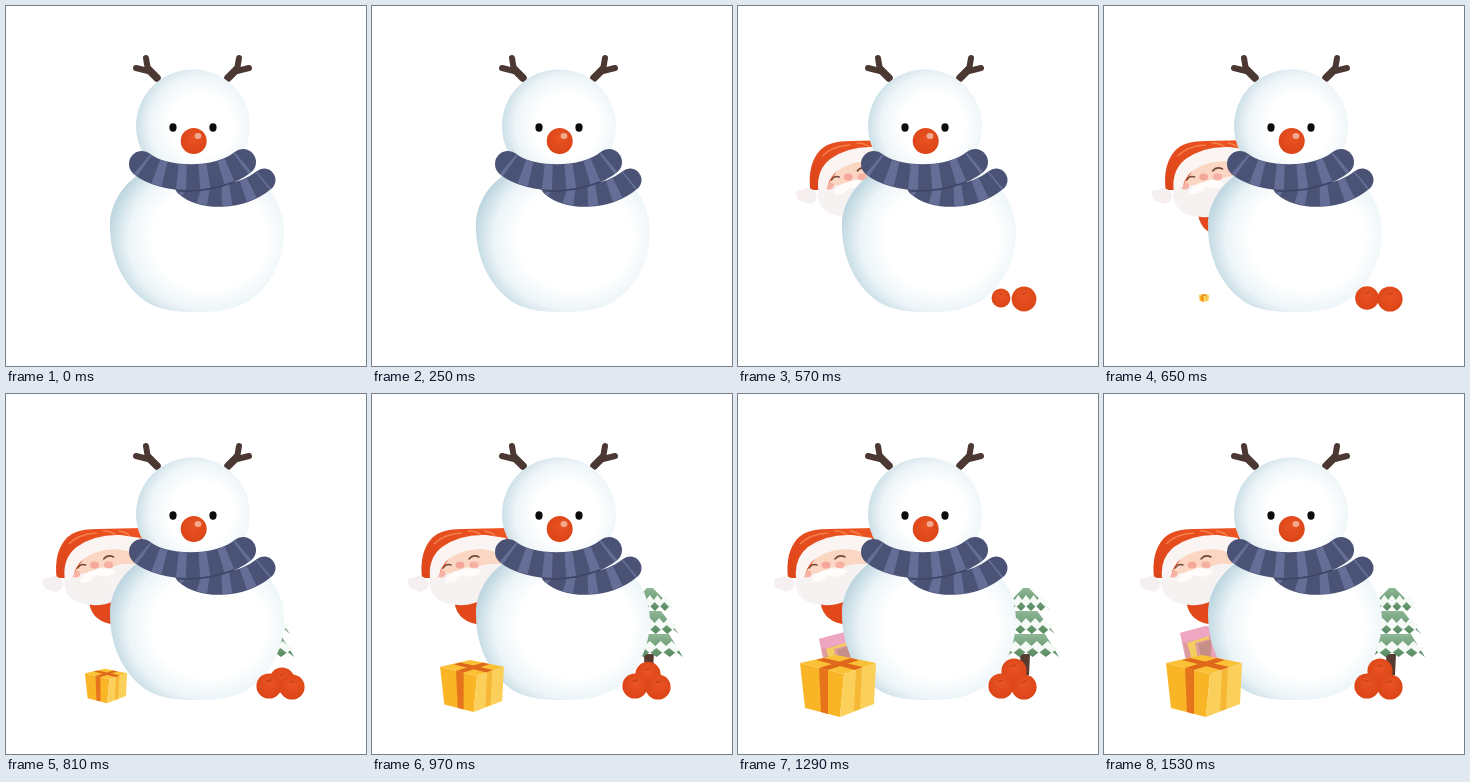
Write an HTML page that moves like this. It is 360 px wide and 360 px high and loops after 2.28 s.

```html
<!DOCTYPE html>
<html lang="en">
<head>
<meta charset="utf-8">
<title>Snowman and friends</title>
<style>
html, body { margin: 0; width: 100%; height: 100%; overflow: hidden; background: #fff; }
svg { display: block; width: 100vw; height: 100vh; }
</style>
</head>
<body>
<svg viewBox="0 0 360 360">
  <defs>
    <radialGradient id="headFill" cx=".57" cy=".5" r=".58">
      <stop offset=".48" stop-color="#fff"/>
      <stop offset=".78" stop-color="#eef5f8"/>
      <stop offset="1" stop-color="#c9dde6"/>
    </radialGradient>
    <radialGradient id="bodyFill" cx=".57" cy=".53" r=".58">
      <stop offset=".56" stop-color="#fff"/>
      <stop offset=".8" stop-color="#edf5f8"/>
      <stop offset="1" stop-color="#bfd7e1"/>
    </radialGradient>
    <radialGradient id="redFill" cx=".52" cy=".4" r=".62">
      <stop offset="0" stop-color="#ea5424"/>
      <stop offset="1" stop-color="#da4416"/>
    </radialGradient>
    <linearGradient id="hatFill" x1="0" y1="1" x2="1" y2="0">
      <stop offset="0" stop-color="#dd451a"/>
      <stop offset="1" stop-color="#ee5422"/>
    </linearGradient>
    <linearGradient id="pineFill" x1="0" y1="0" x2="0" y2="1">
      <stop offset="0" stop-color="#8fb796"/>
      <stop offset="1" stop-color="#568a60"/>
    </linearGradient>
    <g id="berry">
      <circle r="12.6" fill="url(#redFill)"/>
      <path d="M-2-5Q0-4 2-6" fill="none" stroke="#b53a18" stroke-linecap="round"/>
    </g>
    <g id="antler" fill="none" stroke="#4b3832" stroke-linecap="round" stroke-linejoin="round">
      <path d="M151 72L142 63" stroke-width="7.5"/>
      <path d="M142 64L140 52M142 65L130 62" stroke-width="6"/>
    </g>
  </defs>

  <g id="tree">
    <path d="M282 260H292L291 281H283Z" fill="#573a30"/>
    <g id="tiers"></g>
  </g>

  <g id="santa">
    <path d="M82 204Q83 226 104 230L124 230V196Z" fill="#e2481c"/>
    <path d="M58 182Q55 200 70 208Q90 215 108 207L130 190V160L90 162Z" fill="#f6f2f2"/>
    <path d="M66 176Q72 162 90 157Q114 152 128 160V170Q112 169 104 174Q92 171 84 179Q74 178 68 184Z" fill="#fbd6c2"/>
    <g fill="#f5a79a">
      <ellipse cx="69" cy="180" rx="4.6" ry="3.4" opacity=".8"/>
      <ellipse cx="102" cy="171" rx="4.6" ry="3.4" opacity=".8"/>
      <ellipse cx="88" cy="171" rx="4.4" ry="3.6"/>
    </g>
    <path d="M71 174Q74 169 79 171M97 165Q101 160 107 163" fill="none" stroke="#75493a" stroke-width="1.5" stroke-linecap="round"/>
    <path d="M88 176Q76 178 73 188Q83 190 90 181Q101 186 110 177Q100 172 88 176Z" fill="#fffcfb"/>
    <path d="M50 184Q47 158 60 144Q69 135 90 135L136 134V152L84 154L64 184Z" fill="url(#hatFill)"/>
    <path d="M62 150Q72 140 90 139M96 137Q106 137 110 142M112 137Q120 138 123 142" fill="none" stroke="#f57f48" stroke-width="1.4"/>
    <path d="M58 184Q56 164 70 153Q88 140 114 141L134 144V159Q108 151 88 159Q71 165 67 181Q63 188 58 184Z" fill="#faf5f3"/>
    <path d="M36 189Q35 183 42 184Q47 180 53 184Q59 190 55 195Q49 200 44 196Q37 196 36 189Z" fill="#f5f0ef"/>
  </g>

  <g id="pinkGift">
    <path d="M76 239L102 232L114 236V264L82 268Z" fill="#eba3ba"/>
    <path d="M79 248L106 242V263L83 268Z" fill="#dd9a9f"/>
    <path d="M76 239L102 232L106 242L80 249Z" fill="#eea6c2"/>
    <path d="M83 249L105 242V245L91 249L94 266H88Z" fill="#f4cd62"/>
    <path d="M94 250L107 246V263H97Z" fill="#c58f88"/>
  </g>

  <use href="#antler"/>
  <use href="#antler" transform="matrix(-1 0 0 1 373 0)"/>
  <path d="M191 150C230 150 278 178 278 225C278 252 267 276 248 291C232 304 212 306 191 306C168 306 148 304 133 290C114 273 104 248 104 220C104 180 145 150 191 150Z" fill="url(#bodyFill)"/>
  <ellipse cx="187" cy="120" rx="57" ry="56.5" fill="url(#headFill)"/>
  <g fill="#0d0b0b">
    <ellipse cx="167" cy="121.5" rx="3.6" ry="4.2"/>
    <ellipse cx="207" cy="121.5" rx="3.6" ry="4.2"/>
  </g>
  <circle cx="187.7" cy="135" r="13" fill="url(#redFill)"/>
  <ellipse cx="192" cy="130" rx="3.4" ry="3" fill="#f3a98e"/>
  <g id="scarf" fill="none"></g>

  <use id="berryTop" href="#berry"/>
  <use id="berryLeft" href="#berry"/>
  <use id="berryRight" href="#berry"/>

  <g id="gift" transform="translate(100 292)">
    <g transform="translate(-100 -292)">
      <path d="M62 269L106 280L102 323L67 314Z" fill="#f9b526"/>
      <path d="M106 280L138 269L136 310L102 323Z" fill="#fbd05a"/>
      <path d="M62 269L98 261L138 269L106 280Z" fill="#fac136"/>
      <path d="M81 274L90 276L90 320L83 318Z" fill="#e6741d"/>
      <path d="M118 276L124 274L122 315L116 317Z" fill="#f6b737"/>
      <path d="M81 274L113 264L121 266L90 276ZM117 276L78 266L86 264L125 273Z" fill="#e0681b"/>
    </g>
  </g>
</svg>
<script>
const LOOP = 2280, START = 250, STEP = 80, LAST = 17;
const $ = id => document.getElementById(id);

// Knitted band: round stroke with dashed stripes on the same curve.
const band = (d, width) => `
  <path d="${d}" stroke="#4a5275" stroke-width="${width}" stroke-linecap="round"/>
  <path d="${d}" stroke="#656e97" stroke-width="${width - 1}" stroke-dasharray="9 13" stroke-dashoffset="6"/>`;
$('scarf').innerHTML =
  band('M180 179C196 193 234 194 258 174', 23) +
  band('M136 158C156 175 212 177 237 156', 26) +
  '<path d="M174 185Q202 186 228 176" stroke="#3d4566" stroke-width="1.6"/>';

// Pine tier: green skirt with a zigzag band of snow.
function tier(i) {
  const x = 288, y = 194 + 23 * i, top = 3 + 8 * i, low = 25 + 4 * i;
  const zigzag = (base, half, shift) => Array.from({ length: 11 }, (_, k) =>
    `${x - half + half * k / 5} ${base + ((k + shift) % 2 ? -3 : 2)}`);
  const skirt = [`${x - top} ${y}`, `${x + top} ${y}`, ...zigzag(y + 21, low, 0).reverse()];
  const snow = [...zigzag(y + 10, low - 6, 0), ...zigzag(y + 17, low - 1, 1).reverse()];
  return `<polygon points="${skirt}" fill="url(#pineFill)"/><polygon points="${snow}" fill="#f6faf7"/>`;
}
$('tiers').innerHTML = [2, 1, 0].map(tier).join('');

// Every part eases out to its place (x, y), by a slide (dx, dy) or by growing.
const parts = [
  { id: 'santa', start: 0, steps: 8.6, dx: 127 },
  { id: 'berryRight', start: 1.5, steps: 4, x: 286, y: 293, grow: true },
  { id: 'berryLeft', start: 3, steps: 4, x: 263, y: 292, grow: true },
  { id: 'tree', start: 5, steps: 7.5, dx: -91 },
  { id: 'gift', start: 5.5, steps: 7.5, x: 100, y: 292, grow: true },
  { id: 'berryTop', start: 6, steps: 7, x: 276, y: 277, dy: 18 },
  { id: 'pinkGift', start: 10, steps: 7.5, dx: 23, dy: 28 }
];

function place({ id, start, steps, x = 0, y = 0, dx = 0, dy = 0, grow }, step) {
  const p = Math.min(1, (step - start) / steps), rest = (1 - p) ** 2, el = $(id);
  el.style.display = p > 0 ? '' : 'none';
  el.setAttribute('transform',
    `translate(${x + dx * rest} ${y + dy * rest}) scale(${grow ? 1 - rest : 1})`);
}

function frame() {
  const t = performance.now() % LOOP;
  const step = Math.max(0, Math.min(LAST, Math.floor((t - START) / STEP) + 1));
  parts.forEach(part => place(part, step));
  requestAnimationFrame(frame);
}
frame();
</script>
</body>
</html>
```
